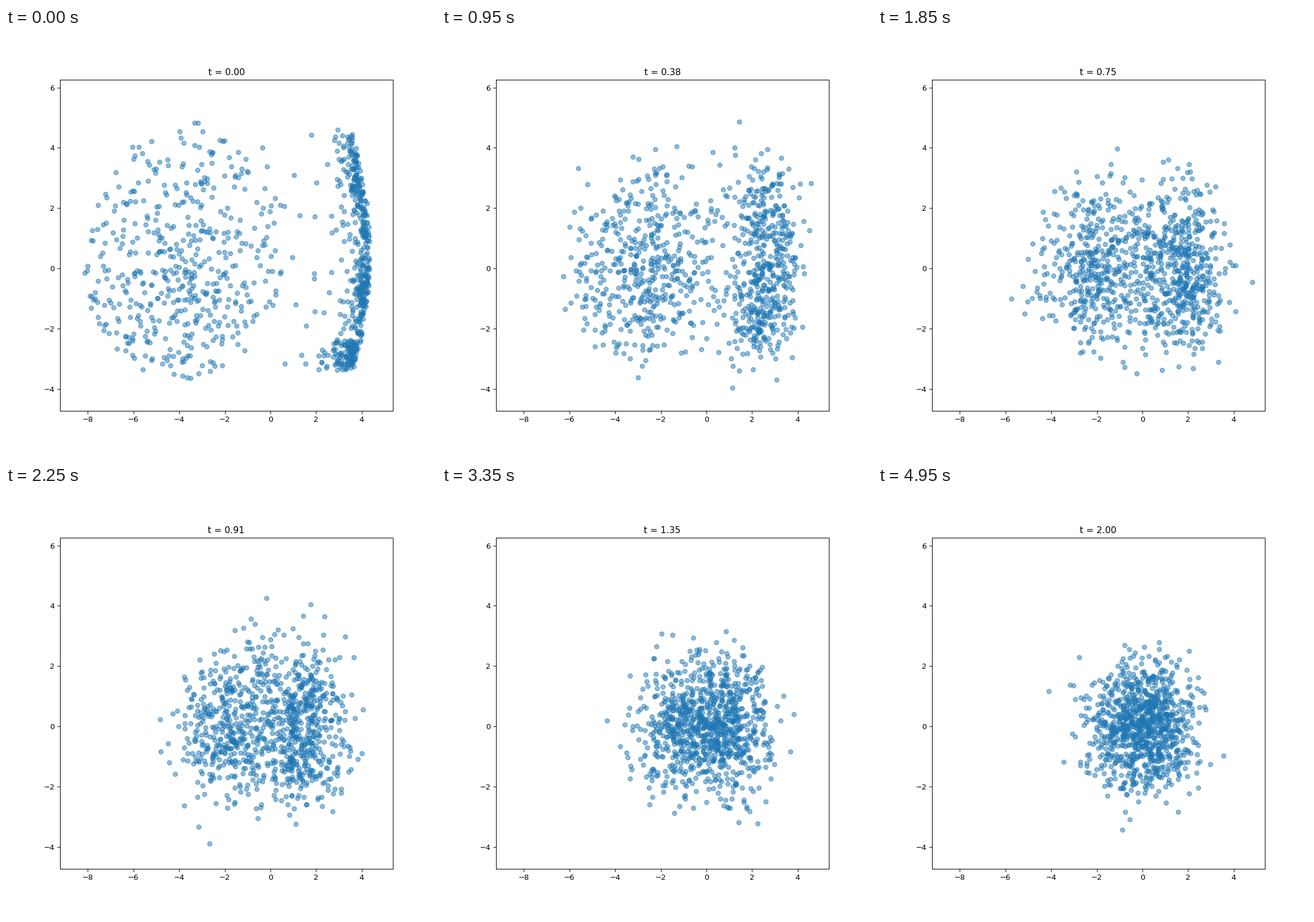
A matplotlib script that plays this animation: 748x748 px, repeating every 5 s.

```python
import numpy as np
import matplotlib.pyplot as plt
from matplotlib.animation import FuncAnimation

INCHES, DPI = 8, 93.5
FRAMES, INTERVAL = 100, 50
T_END = 2.0

rng = np.random.default_rng(7)


def blob(n):
    """Broad round cluster that reaches further up than down."""
    angle = rng.uniform(0, 2 * np.pi, n)
    radius = rng.uniform(0, 1, n) ** 0.62
    x = -3.85 + 4.3 * radius * np.cos(angle)
    y = radius * np.sin(angle)
    return np.column_stack([x, y * np.where(y > 0, 4.9, 3.7)])


def crescent(n):
    """Arc with a sharp outer edge, wider towards both ends."""
    y = np.concatenate([
        rng.normal(-2.8, 0.36, int(0.27 * n)),
        rng.normal(-0.7, 0.6, int(0.12 * n)),
        rng.normal(3.0, 0.55, int(0.15 * n)),
        rng.normal(3.9, 0.4, int(0.08 * n)),
        rng.uniform(-2.2, 2.8, int(0.38 * n)),
    ])
    # Fold the tails back inside the two tips.
    y = np.abs(y + 3.4) - 3.4
    y = 4.7 - np.abs(4.7 - y)
    edge = 4.38 - 0.047 * (y - 0.5) ** 2
    spread = 0.14 + np.where(y < 0, 0.014, 0.004) * y ** 2
    return np.column_stack([edge - rng.gamma(2.2, spread), y])


def bridge(n):
    """Sparse points between the two clusters."""
    return rng.uniform((-0.4, -3.4), (3.4, 4.3), (n, 2))


start = np.vstack([blob(480), crescent(490), bridge(35)])


def diffuse(t, seed):
    """Shrink towards the origin while mixing in unit Gaussian noise."""
    noise = np.random.default_rng(seed).normal(size=start.shape)
    return start * np.exp(-t) + noise * np.sqrt(1 - np.exp(-2 * t))


fig, ax = plt.subplots(figsize=(INCHES, INCHES), dpi=DPI)
ax.set_xlim(-9.225, 5.367)
ax.set_ylim(-4.727, 6.266)
dots = ax.scatter(start[:, 0], start[:, 1], color="tab:blue", alpha=0.5)
title = ax.set_title("t = 0.00")


def update(frame):
    t = T_END * frame / (FRAMES - 1)
    dots.set_offsets(diffuse(t, frame))
    title.set_text(f"t = {t:.2f}")
    return dots, title


anim = FuncAnimation(fig, update, frames=FRAMES, interval=INTERVAL,
                     repeat=True, repeat_delay=0)
plt.show()
```
